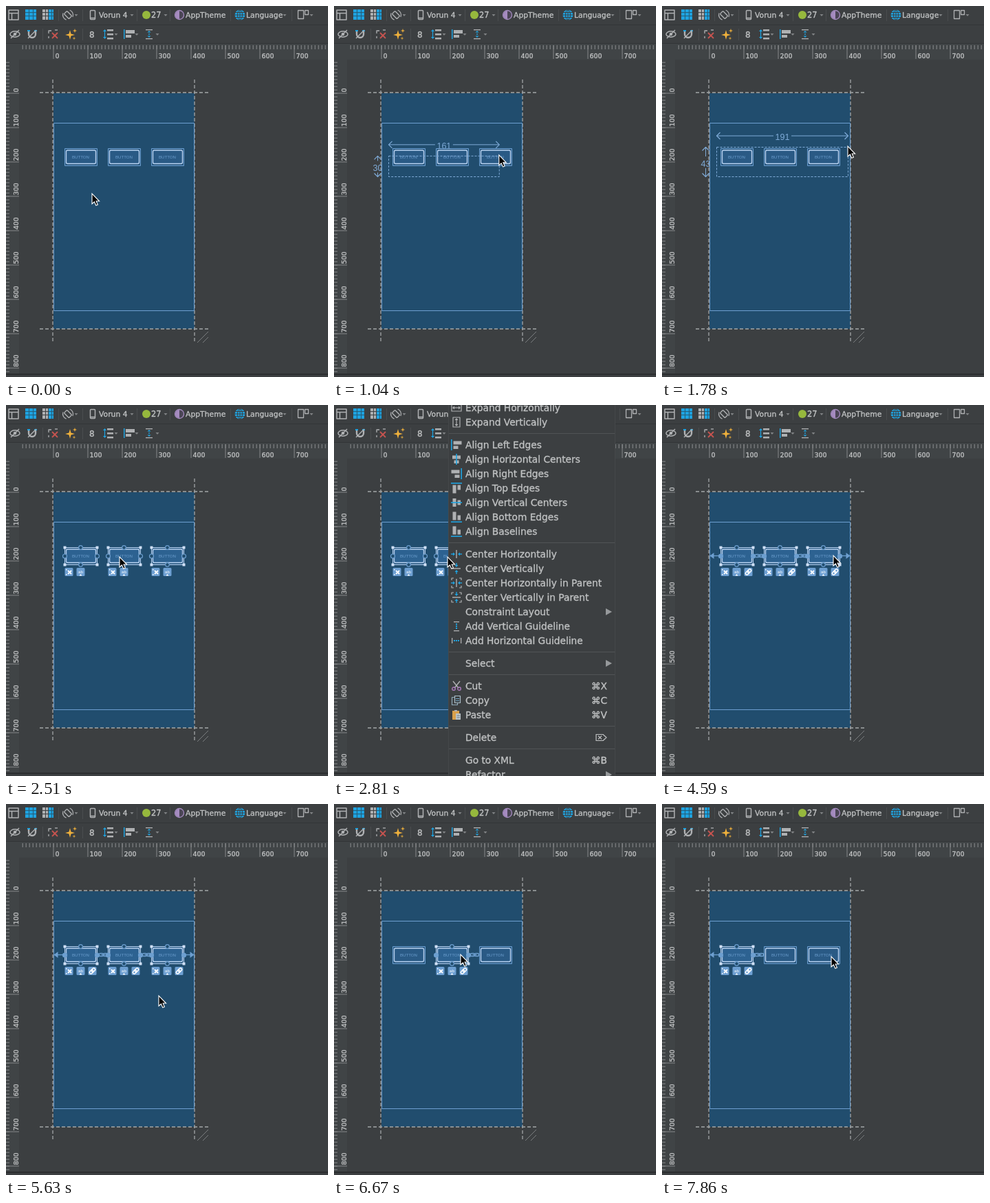
An HTML page with a canvas that plays this animation: 468x540 px, repeating every 8 s.

```html
<!DOCTYPE html>
<html lang="en">
<head>
<meta charset="utf-8">
<title>Layout editor</title>
<style>
html, body { margin: 0; width: 100%; height: 100%; overflow: hidden; background: #3c3f41; }
canvas { display: block; width: 468px; height: 540px; }
</style>
</head>
<body>
<canvas id="stage" width="468" height="540"></canvas>
<script>
const c = document.getElementById('stage').getContext('2d');
const LOOP = 8000, Q = Math.PI / 2;
const UI = '"DejaVu Sans", sans-serif', SANS = '"Liberation Sans", Arial, sans-serif';
const BG = '#3c3f41', GREY = '#afb1b3', TXT = '#c0c2c3', BLUE = '#1fa3e0';
const PAPER = '#214d6e', LINE = '#6d9fd0', PALE = '#b9d3f2';

function box(x, y, w, h, col) { c.fillStyle = col; c.fillRect(x, y, w, h); }
function frame(x, y, w, h, col, lw = 1, r = 0) {
  c.strokeStyle = col; c.lineWidth = lw;
  c.beginPath(); c.roundRect(x, y, w, h, r); c.stroke();
}
function path(col, lw, ...pts) {
  c.strokeStyle = col; c.lineWidth = lw;
  c.beginPath();
  for (let i = 0; i < pts.length; i += 2) c.lineTo(pts[i], pts[i + 1]);
  c.stroke();
}
function poly(col, ...pts) {
  c.fillStyle = col;
  c.beginPath();
  for (let i = 0; i < pts.length; i += 2) c.lineTo(pts[i], pts[i + 1]);
  c.closePath(); c.fill();
}
function disc(x, y, r, fill, stroke, lw = 1) {
  c.beginPath(); c.arc(x, y, r, 0, 7);
  if (fill) { c.fillStyle = fill; c.fill(); }
  if (stroke) { c.strokeStyle = stroke; c.lineWidth = lw; c.stroke(); }
}
function text(s, x, y, size, col = TXT, align = 'left', face = UI) {
  c.font = size + 'px ' + face; c.textAlign = align; c.fillStyle = col;
  c.fillText(s, x, y);
  if (face !== UI) return;
  c.lineJoin = 'round'; c.lineWidth = 0.35; c.strokeStyle = col;
  c.strokeText(s, x, y);
}
function at(x, y, turn, fn) {
  c.save(); c.translate(x, y); c.rotate(turn); fn(); c.restore();
}
const drop = (x, y) => poly('#808385', x - 2.5, y - 1, x + 2.5, y - 1, x, y + 2);

/* Toolbars */
function gridIcon(x, y, w, cols, col, gap) {
  box(x, y, w, 15, col);
  for (let i = 1; i < cols; i++) box(x + Math.round(i * w / cols), y, 1, 15, gap);
  for (const j of [4, 9]) box(x, y + j, w, 1, gap);
}
function toolbarTop() {
  frame(4, 6, 14, 14, GREY, 1.5);
  path(GREY, 1.5, 4, 10.5, 18, 10.5);
  path(GREY, 1.5, 8.5, 10, 8.5, 20);
  gridIcon(28, 5, 16, 3, BLUE, '#245d78');
  gridIcon(53, 5, 8, 2, GREY, BG);
  gridIcon(62, 5, 7, 2, BLUE, '#245d78');
  at(90, 13, -Math.PI / 4, () => frame(-3, -5, 6, 10, GREY, 1.4, 1));
  c.strokeStyle = GREY; c.lineWidth = 1.2;
  c.beginPath(); c.arc(90, 13, 7.5, -1.2, 0.4); c.stroke();
  c.beginPath(); c.arc(90, 13, 7.5, 1.9, 3.5); c.stroke();
  drop(102, 13);
  frame(122.5, 6.5, 7, 13, GREY, 1.5, 1);
  path(GREY, 1.5, 122, 17.5, 130, 17.5);
  text('Vorun 4', 135, 17, 10.8); drop(183, 13);
  disc(204, 13, 6, '#96b83d');
  text('27', 211, 17, 11.4); drop(232, 13);
  disc(252, 13, 6.5, '#4b4556', '#a58bc0', 1.3);
  c.fillStyle = '#a58bc0';
  c.beginPath(); c.arc(252, 13, 6, Q, Q * 3); c.fill();
  text('AppTheme', 261, 17, 10.8);
  disc(340, 13, 7.5, BLUE);
  c.strokeStyle = BG; c.lineWidth = 1;
  c.beginPath(); c.ellipse(340, 13, 3.5, 7.5, 0, 0, 7); c.stroke();
  path(BG, 1, 340, 5, 340, 21);
  for (const y of [9.5, 13, 16.5]) path(BG, 1, 332, y, 348, y);
  text('Language', 349, 17, 10.8); drop(405, 13);
  frame(424.5, 6.5, 8, 12, GREY, 1.3);
  frame(434.5, 6.5, 5, 6, GREY, 1.3);
  drop(444, 13);
  for (const x of [76, 111, 190, 238, 326, 415]) box(x, 5, 1, 17, '#4a4d4f');
}
function toolbarLow() {
  c.strokeStyle = GREY; c.lineWidth = 1.5;
  c.beginPath(); c.ellipse(13, 41, 7, 4.2, 0, 0, 7); c.stroke();
  disc(13, 41, 2.3, GREY);
  path(GREY, 1.4, 7, 47, 19, 35);
  c.strokeStyle = GREY; c.lineWidth = 2.4;
  c.beginPath(); c.moveTo(33, 36); c.lineTo(33, 41);
  c.arc(38, 41, 5, Math.PI, 0, true); c.lineTo(43, 36); c.stroke();
  box(31, 35, 4, 2, BLUE); box(41, 35, 4, 2, BLUE);
  path(GREY, 1.4, 32, 47, 44, 35);
  path('#c75450', 1.8, 67, 39, 75, 47);
  path('#c75450', 1.8, 75, 39, 67, 47);
  path(GREY, 1.3, 62, 40, 62, 36, 66, 36);
  path(GREY, 1.3, 71, 35, 75, 35);
  path(GREY, 1.3, 62, 44, 62, 47);
  star(93, 42, 7); star(100, 36, 3.2); star(99, 47, 2.5);
  text('8', 121, 45.5, 12);
  for (const y of [34, 40, 46]) box(147, y, 9, 2.5, GREY);
  path(BLUE, 1.2, 143.5, 35, 143.5, 47);
  poly(BLUE, 141, 37, 146, 37, 143.5, 34);
  poly(BLUE, 141, 45, 146, 45, 143.5, 48);
  drop(160, 41);
  box(171, 34, 1.5, 14, BLUE); box(174, 35, 13, 5, GREY); box(174, 42, 8, 4, GREY);
  drop(190, 41);
  beam(208, 41); drop(220, 41);
  for (const x of [53, 111]) box(x, 33, 1, 17, '#4a4d4f');
}
function star(x, y, r) {
  const p = [];
  for (let i = 0; i < 8; i++) {
    const d = i % 2 ? r * 0.3 : r, a = i * Math.PI / 4;
    p.push(x + d * Math.cos(a), y + d * Math.sin(a));
  }
  poly('#f0b13c', ...p);
}
function beam(x, y) {
  at(x, y, 0, () => {
    box(-5, -7, 10, 1.3, GREY); box(-5, 6, 10, 1.3, GREY);
    for (const s of [-1, 1]) poly(BLUE, -2.5, s * 2.5, 2.5, s * 2.5, 0, s * 5);
    box(-0.7, -1, 1.4, 2, BLUE);
  });
}

/* Rulers and empty surface */
function rulers() {
  box(0, 27, 468, 1, '#323537');
  box(0, 54, 468, 1, '#323537');
  box(0, 55, 468, 23, '#404446');
  box(0, 78, 19, 457, '#404446');
  for (let x = 24; x < 468; x += 5) box(x - 0.5, 57, 1.5, 6, '#727577');
  for (let y = 82; y < 535; y += 5) box(0, y - 0.5, 5, 1.5, '#727577');
  for (let i = 0; i < 9; i++) {
    const x = 69 + i * 50, y = 127 + i * 50, s = String(i * 100);
    if (i < 8) {
      box(x - 0.5, 57, 1, 20, '#85888a');
      text(s, x + 2.5, 76, 9.5);
    }
    box(0, y - 0.5, 19, 1, '#85888a');
    at(18, y - 1.5, -Q, () => text(s, 0, 0, 9.5));
  }
  box(0, 535, 468, 2, '#2c2e30');
}
function device() {
  box(69, 127, 205, 343, PAPER);
  c.setLineDash([5, 3]);
  for (const x of [68, 274]) path('#a3a6a8', 1.3, x, 107, x, 488);
  for (const y of [126, 470]) path('#a3a6a8', 1.3, 49, y, 295, y);
  c.setLineDash([]);
  path('#7b7e80', 1, 278, 490, 294, 474);
  path('#7b7e80', 1, 286, 490, 294, 482);
  frame(69.5, 170.5, 204, 273, LINE);
}

/* Buttons with their selection marks */
function button(i, on, chained) {
  const x = 85.5 + i * 63, y = 207.5, mid = x + 23, cy = 220;
  box(x, y, 47, 25, '#28577f');
  box(x + 2, y + 3, 43, 19, on ? '#2d6291' : '#2a5a85');
  frame(x + 2, y + 2.5, 43, 19.5, PALE, 1.4, 2);
  frame(x, y, 47, 25, on ? PALE : LINE);
  text('BUTTON', mid, 222, 6.1, LINE, 'center', SANS);
  if (!on) return;
  if (chained) chain(i, x, cy);
  for (const dx of [0, 47]) for (const dy of [0, 25]) box(x + dx - 2, y + dy - 2, 4, 4, '#cfe0f6');
  for (const dy of [0, 25]) disc(mid, y + dy, 2.8, PAPER, LINE, 1.2);
  for (const dx of [0, 47]) disc(x + dx, cy, 3, chained ? LINE : PAPER, LINE, 1.2);
  chip(x, chipClear); chip(x + 17, chipBase);
  if (chained) chip(x + 34, chipLink);
}
function chain(i, x, y) {
  if (i === 0) arrowTo(69.5, x, y, 1);
  if (i === 2) arrowTo(273.5, x + 47, y, -1);
  else {
    frame(x + 50, y - 2.5, 6, 4, LINE, 1.4, 1.5);
    frame(x + 56, y - 2.5, 6, 4, LINE, 1.4, 1.5);
    path(LINE, 1.4, x + 53, y - 0.5, x + 59, y - 0.5);
  }
}
function arrowTo(end, from, y, s) {
  path(LINE, 1.3, end, y - 0.5, from, y - 0.5);
  poly(LINE, end, y - 0.5, end + s * 6, y - 5, end + s * 6, y + 4);
}
function chip(x, glyph) {
  c.fillStyle = '#6d9fd2';
  c.beginPath(); c.roundRect(x, 237, 12, 12, 1.5); c.fill();
  at(x, 237, 0, glyph);
}
function chipClear() {
  path('#fff', 1.8, 4.5, 4, 9.5, 9);
  path('#fff', 1.8, 9.5, 4, 4.5, 9);
  for (const y of [2, 9]) box(1.5, y, 1.5, 1.5, '#fff');
}
function chipBase() {
  text('ab', 6, 7.5, 8, '#fff', 'center', 'bold ' + SANS);
  poly('#fff', 4, 11.5, 8, 11.5, 6, 9);
}
function chipLink() {
  at(6, 6, -Math.PI / 4, () => {
    frame(-5, -2, 6, 4, '#fff', 1.5, 2);
    frame(-1, -2, 6, 4, '#fff', 1.5, 2);
  });
}

/* Rubber band with its measures */
function head(x, y, turn) { at(x, y, turn, () => path('#7fabd8', 1.2, 5, -5, 0, 0, 5, 5)); }
function band(px, py) {
  const x = 79.5, b = 248.5, r = px + 0.5, t = py + 1.5, w = r - x, h = b - t;
  if (w < 4) return;
  const col = '#7fabd8', ay = t - 16.5, ax = x - 16, mx = (x + r) / 2, my = (t + b) / 2;
  c.setLineDash([3, 2]); frame(x, t, w, h, col); c.setLineDash([]);
  if (w > 40) {
    path(col, 1, x, ay, mx - 13, ay); path(col, 1, mx + 13, ay, r, ay);
    head(x, ay, 0); head(r, ay, Math.PI);
  }
  text(String(Math.round(w)), mx, ay + 6, 12.5, col, 'center', SANS);
  if (h > 18) {
    path(col, 1, ax, t, ax, my - 8); path(col, 1, ax, my + 9, ax, b);
    head(ax, t, Q); head(ax, b, -Q);
  }
  text(String(Math.round(h)), ax, my + 7, 12.5, col, 'center', SANS);
}

/* Context menu icons; "flip" swaps the axes */
function swapped(flip, fn) {
  return () => { if (flip) c.transform(0, 1, 1, 0, 0, 0); fn(); };
}
function alignIcon(flip, side) {
  const left = w => side < 0 ? -4.5 : side > 0 ? 4.5 - w : -w / 2;
  return swapped(flip, () => {
    box(left(12), -5.5, 12, 5, GREY);
    box(left(7), 1.5, 7, 4.5, GREY);
    box(side * 7.2 - 0.8, -8, 1.6, 16, BLUE);
  });
}
function centerIcon(flip, inParent) {
  return swapped(flip, () => {
    box(-0.7, -6, 1.4, 12, GREY);
    for (const s of [-1, 1]) {
      path(BLUE, 1.4, s * 8, 0, s * 4, 0);
      poly(BLUE, s * 5, -2.5, s * 5, 2.5, s * 2, 0);
      if (inParent) for (const v of [-1, 1])
        path(GREY, 1.2, s * 4, v * 7, s * 7, v * 7, s * 7, v * 4);
    }
  });
}
function expandIcon(flip) {
  return swapped(flip, () => {
    frame(-7, -5, 14, 10, GREY, 1.2);
    path(GREY, 1.2, -5, 0, 5, 0);
    for (const s of [-1, 1]) poly(GREY, s * 3, -2.5, s * 3, 2.5, s * 6, 0);
  });
}
function guideIcon(flip) {
  return swapped(flip, () => {
    box(-4, -7, 8, 1.3, GREY); box(-4, 6, 8, 1.3, GREY);
    for (const y of [-4, -1, 2]) box(-1, y, 2, 2, BLUE);
  });
}
function cutIcon() {
  path(GREY, 1.4, -5, -7, 3, 3); path(GREY, 1.4, 5, -7, -3, 3);
  disc(-4, 4, 2.3, null, '#a678b8', 1.4); disc(4, 4, 2.3, null, '#a678b8', 1.4);
}
function copyIcon() {
  frame(-6.5, -4.5, 8, 11, '#8fa9b8', 1.2);
  box(-2.5, -7, 9, 11, BG); frame(-2.5, -6.5, 8, 10, '#a9bdc8', 1.2);
  path('#6fa4c4', 1, -1, -2.5, 4, -2.5); path('#6fa4c4', 1, -1, 0.5, 4, 0.5);
}
function pasteIcon() {
  box(-6, -6, 10, 13, '#d9a04c'); box(-3, -7, 4, 2, GREY);
  box(-1, -2, 7, 9, '#bcc4c9'); path('#6d7f8a', 1, 0.5, 1, 5, 1); path('#6d7f8a', 1, 0.5, 4, 5, 4);
}
const rows = [
  [4, 'Expand Horizontally', expandIcon(false)],
  [25, 'Expand Vertically', expandIcon(true)],
  [58, 'Align Left Edges', alignIcon(false, -1)],
  [79, 'Align Horizontal Centers', alignIcon(false, 0)],
  [100, 'Align Right Edges', alignIcon(false, 1)],
  [121, 'Align Top Edges', alignIcon(true, -1)],
  [142, 'Align Vertical Centers', alignIcon(true, 0)],
  [163, 'Align Bottom Edges', alignIcon(true, 1)],
  [184, 'Align Baselines', alignIcon(true, 1)],
  [217, 'Center Horizontally', centerIcon(false)],
  [238, 'Center Vertically', centerIcon(true)],
  [259, 'Center Horizontally in Parent', centerIcon(false, true)],
  [280, 'Center Vertically in Parent', centerIcon(true, true)],
  [301, 'Constraint Layout', null, '>'],
  [322, 'Add Vertical Guideline', guideIcon(false)],
  [343, 'Add Horizontal Guideline', guideIcon(true)],
  [376, 'Select', null, '>'],
  [409, 'Cut', cutIcon, '⌘X'],
  [430, 'Copy', copyIcon, '⌘C'],
  [451, 'Paste', pasteIcon, '⌘V'],
  [484, 'Delete', null, 'del'],
  [517, 'Go to XML', null, '⌘B'],
  [538, 'Refactor', null, '>']
];
function menu() {
  box(166, 0, 243, 540, BG);
  box(166, 0, 1, 540, '#45484a'); box(408, 0, 1, 540, '#45484a');
  rows.forEach(([y, label, icon, key], i) => {
    const gap = i ? y - rows[i - 1][0] : 0;
    if (gap > 21) box(167, Math.floor(y - gap / 2), 241, 1, '#515456');
    if (icon) at(178, y, 0, icon);
    text(label, 191, y + 5, 13.75);
    if (key === '>') poly('#96999b', 395, y - 5, 395, y + 5, 404, y);
    else if (key === 'del') {
      path(TXT, 1.2, 381, y - 4.5, 391, y - 4.5, 396, y, 391, y + 4.5, 381, y + 4.5, 381, y - 5);
      path(TXT, 1.1, 384, y - 2.5, 389, y + 2.5); path(TXT, 1.1, 389, y - 2.5, 384, y + 2.5);
    } else if (key) text(key, 397, y + 5, 13.75, TXT, 'right');
  });
}

/* Pointer */
function pointer(x, y) {
  at(x, y, 0, () => {
    c.beginPath();
    for (const [a, b] of [[0, 0], [0, 15], [3.4, 12], [5.8, 17.3], [8.4, 16.2], [6.1, 11], [10.6, 11]]) c.lineTo(a, b);
    c.closePath();
    c.fillStyle = '#000'; c.fill();
    c.strokeStyle = '#fff'; c.lineWidth = 1.1; c.lineJoin = 'miter'; c.stroke();
  });
}
const track = [
  [0, 125, 273], [150, 118, 270], [440, 79, 248], [600, 79, 248], [1190, 270, 211],
  [1340, 276, 207], [1770, 270, 204], [1930, 270, 204], [2360, 165, 221],
  [2810, 165, 221], [3260, 168, 222], [3560, 205, 226], [4140, 249, 219], [4590, 249, 219],
  [5030, 247, 224], [5630, 222, 279], [5930, 220, 272], [6370, 184, 219],
  [6670, 184, 219], [7120, 165, 221], [7410, 112, 222], [7560, 112, 222], [7860, 246, 222]
];
function pointerAt(t) {
  const i = track.findIndex(k => k[0] > t);
  if (i < 0) return track[track.length - 1].slice(1);
  const [t0, x0, y0] = track[i - 1], [t1, x1, y1] = track[i];
  const u = (t - t0) / (t1 - t0), e = u * u * (3 - 2 * u);
  return [x0 + (x1 - x0) * e, y0 + (y1 - y0) * e];
}

const beats = [
  [150, 1190, 8], [1340, 2360, 8], [2510], [2810], [3260, 4140, 7], [4590],
  [5030, 5630, 5], [5930, 6370, 4], [6670], [7120, 7860, 6]
];
function hold(t) {
  let q = 0;
  for (const [a, b = a, n = 1] of beats) {
    if (t < a) break;
    const step = n > 1 ? (b - a) / (n - 1) : 1;
    q = a + Math.min(n - 1, Math.floor((t - a) / step + 0.01)) * step;
  }
  return q;
}
function picked(t) {
  if (t < 1900) return [];
  if (t < 5930) return [0, 1, 2];
  if (t < 6670) return [];
  return t < 7400 ? [1] : [0];
}

function draw(t) {
  const [x, y] = pointerAt(t), sel = picked(t);
  box(0, 0, 468, 540, BG);
  rulers(); toolbarTop(); toolbarLow(); device();
  for (let i = 0; i < 3; i++) button(i, sel.includes(i), t >= 4590);
  if (t > 590 && t < 1900) band(x, y);
  if (t >= 2810 && t < 4590) menu();
  pointer(x, y);
}
function tick() {
  draw(hold(performance.now() % LOOP));
  requestAnimationFrame(tick);
}
tick();
</script>
</body>
</html>
```
